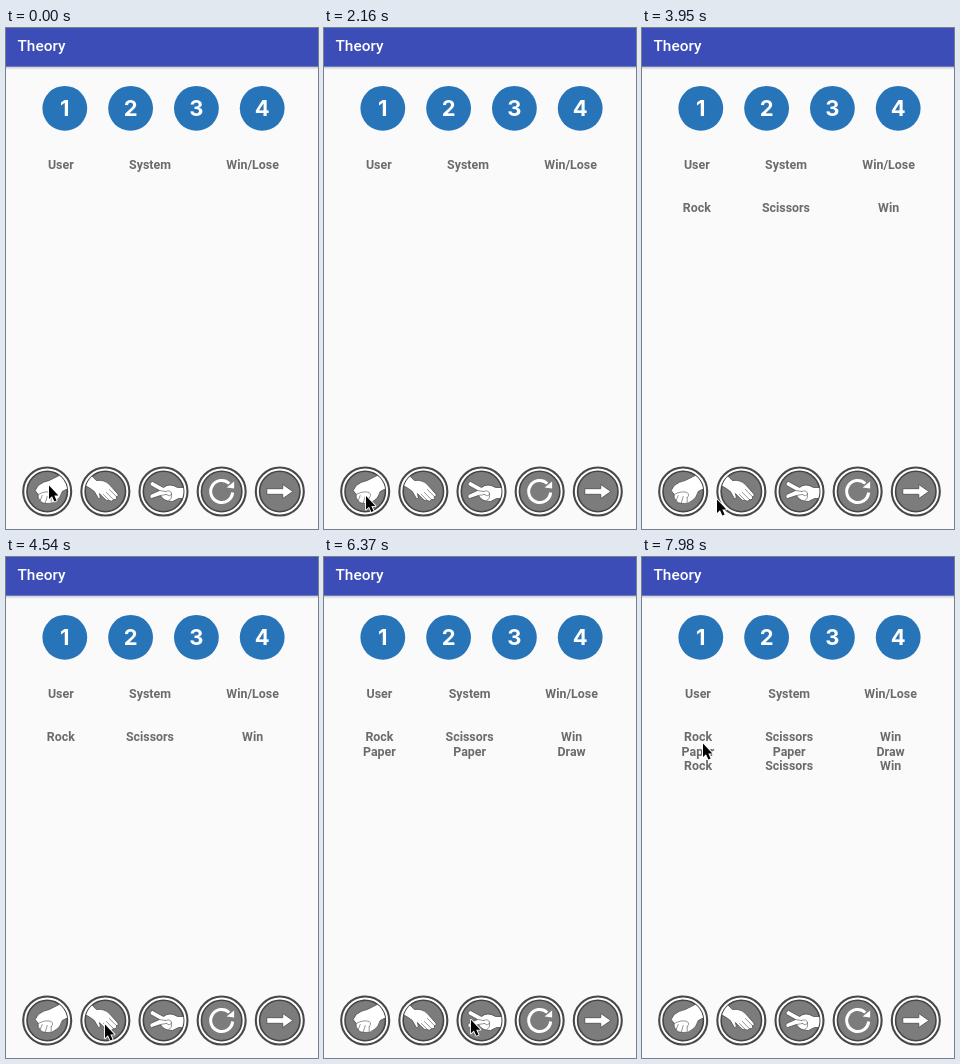
An HTML page that plays this animation: 312 by 501 pixels, repeating every 8 s.

```html
<!DOCTYPE html>
<html lang="en">
<head>
<meta charset="utf-8">
<title>Theory</title>
<style>
html, body { margin: 0; width: 100%; height: 100%; overflow: hidden; background: #fafafa; }
svg { display: block; width: 312px; height: 501px; }
.label { font: 700 12.4px Roboto, sans-serif; fill: #6b6b6b; text-anchor: middle; }
.digit { font: 700 22px Inter, sans-serif; fill: #fff; text-anchor: middle; }
.title { font: 500 15.4px Roboto, sans-serif; fill: #fff; }
.icon { fill: #fff; stroke: #3f3f3f; stroke-width: .7; stroke-linejoin: round; }
.crease { fill: none; stroke: #666; stroke-width: .7; stroke-linecap: round; }
</style>
</head>
<body>
<svg viewBox="0 0 312 501">
  <defs>
    <linearGradient id="shade" x2="0" y2="1">
      <stop offset="0" stop-color="#8c8fa6"/>
      <stop offset=".4" stop-color="#d9dae0"/>
      <stop offset="1" stop-color="#fafafa"/>
    </linearGradient>
    <clipPath id="disc"><circle r="20"/></clipPath>
  </defs>
  <rect width="312" height="501" fill="#fafafa"/>
  <rect y="38" width="312" height="4" fill="url(#shade)"/>
  <rect width="312" height="38.5" fill="#3d4db7"/>
  <text class="title" x="11.5" y="23">Theory</text>
  <g id="badges"></g>
  <g id="table"></g>
  <g id="buttons"></g>
  <path id="cursor" d="M1 1.6V15L4 12.2L6.4 17.4L8.6 16.4L6.3 11.4H10.4Z"
    stroke="#fff" stroke-width="1.8" stroke-linejoin="round" paint-order="stroke"/>
</svg>
<script>
const $ = id => document.getElementById(id);
const LOOP = 8000;

$('badges').innerHTML = [1, 2, 3, 4].map((n, i) => {
  const x = 58.8 + 65.8 * i;
  return `<circle cx="${x}" cy="80.3" r="22.4" fill="#2874b9"/>
    <text class="digit" x="${x}" y="88.3">${n}</text>`;
}).join('');

const icons = {
  fist: `<path class="icon" d="M-12-1L-9-6Q-4-10 2-11L18-19L23-4L15 0Q13 7 9 9Q5 13-1 12Q-6 12-7 9Q-10 7-9 3Z"/>
    <path class="crease" d="M-7 9L-5 4M-2 12L0 5M4 11V6M-9 3Q-2-1 4 1Q7 4 4 6"/>`,
  palm: `<path class="icon" d="M-22-7L-14-16L-9-11Q-1-12 4-7L12 2Q14 5 11 5Q12 9 8 8Q7 11 4 9Q1 10-2 6L-6 2Q-4 8-7 7L-11 0L-15-3Z"/>
    <path class="crease" d="M11 5L4-2M8 8L1 1M4 9L-2 3"/>`,
  victory: `<path class="icon" d="M22-4H14Q6-9 0-4L-11-10Q-15-9-13-6L-4-1L-13 3Q-15 6-12 7L-3 4Q0 10 9 10L15 7H22Z"/>
    <path class="crease" d="M-4-1L2 0M-3 4L3 3M2 0Q7-2 8 2Q7 6 3 3M5 9Q9 8 8 2"/>`,
  reload: `<path d="M7.6-8A11 11 0 1 0 11 1" fill="none" stroke="#fff" stroke-width="3"/>
    <path d="M5-4L12.5-10V-3Z" fill="#fff"/>`,
  next: `<path class="icon" d="M-13-2.8H3V-7L13 0L3 7V2.8H-13Z"/>`
};

$('buttons').innerHTML = Object.values(icons).map((art, i) =>
  `<g transform="translate(${41.2 + i * 58.15} 463.5)">
    <circle r="24" fill="#fff" stroke="#484848" stroke-width="2.1"/>
    <circle r="20.2" fill="#7c7c7c" stroke="#454545" stroke-width="1.6"/>
    <g clip-path="url(#disc)">${art}</g>
  </g>`).join('');

const columns = [
  { name: 'User', x: 54.8, drift: .6 },
  { name: 'System', x: 144, drift: 1.6 },
  { name: 'Win/Lose', x: 246.6, drift: 1 }
];
const rounds = [
  { at: 3170, cells: ['Rock', 'Scissors', 'Win'] },
  { at: 5610, cells: ['Paper', 'Paper', 'Draw'] },
  { at: 7630, cells: ['Rock', 'Scissors', 'Win'] }
];

// each move starts where the last one ended; bend is the curve's control point
const rest = [42, 456];
const moves = [
  { start: 960, end: 1750, steps: 15, bend: [33.5, 492], to: [42, 470] },
  { start: 1810, end: 1810, steps: 1, to: [41, 469] },
  { start: 1990, end: 2160, steps: 3, to: [41, 466.5] },
  { start: 3170, end: 3950, steps: 13, bend: [52, 498], to: [74, 470] },
  { start: 4010, end: 4180, steps: 4, to: [98, 468] },
  { start: 4480, end: 4540, steps: 2, to: [98, 466] },
  { start: 5790, end: 5960, steps: 4, to: [139, 460] },
  { start: 6190, end: 6870, steps: 12, bend: [172, 464], to: [48, 459] },
  { start: 7350, end: 7980, steps: 10, to: [60, 185] }
];

const soft = u => (u + u * u * (3 - 2 * u)) / 2;
const mix = (a, b, u) => a.map((v, i) => v + (b[i] - v) * u);

function pointer(t) {
  let pos = rest;
  for (const { start, end, steps, bend, to } of moves) {
    if (t < start) break;
    const k = t >= end ? steps - 1 : Math.floor((t - start) / (end - start) * (steps - 1));
    const u = soft((k + 1) / steps);
    const mid = bend || mix(pos, to, .5);
    pos = mix(mix(pos, mid, u), mix(mid, to, u), u);
  }
  return pos;
}

let shown = -1;
function drawTable(count) {
  if (count === shown) return;
  shown = count;
  const row = (cells, y) => cells.map((s, i) => {
    const x = columns[i].x + columns[i].drift * Math.max(0, count - 1);
    return `<text class="label" x="${x}" y="${y}">${s}</text>`;
  }).join('');
  $('table').innerHTML = row(columns.map(c => c.name), 140.5) +
    rounds.slice(0, count).map((r, i) => row(r.cells, 184 + i * 14.5)).join('');
}

function render(t) {
  drawTable(rounds.filter(r => t >= r.at).length);
  $('cursor').setAttribute('transform', `translate(${pointer(t).join(' ')})`);
}

const born = performance.now();
function tick(now) {
  render(Math.max(0, now - born) % LOOP);
  requestAnimationFrame(tick);
}
render(0);
requestAnimationFrame(tick);
</script>
</body>
</html>
```
